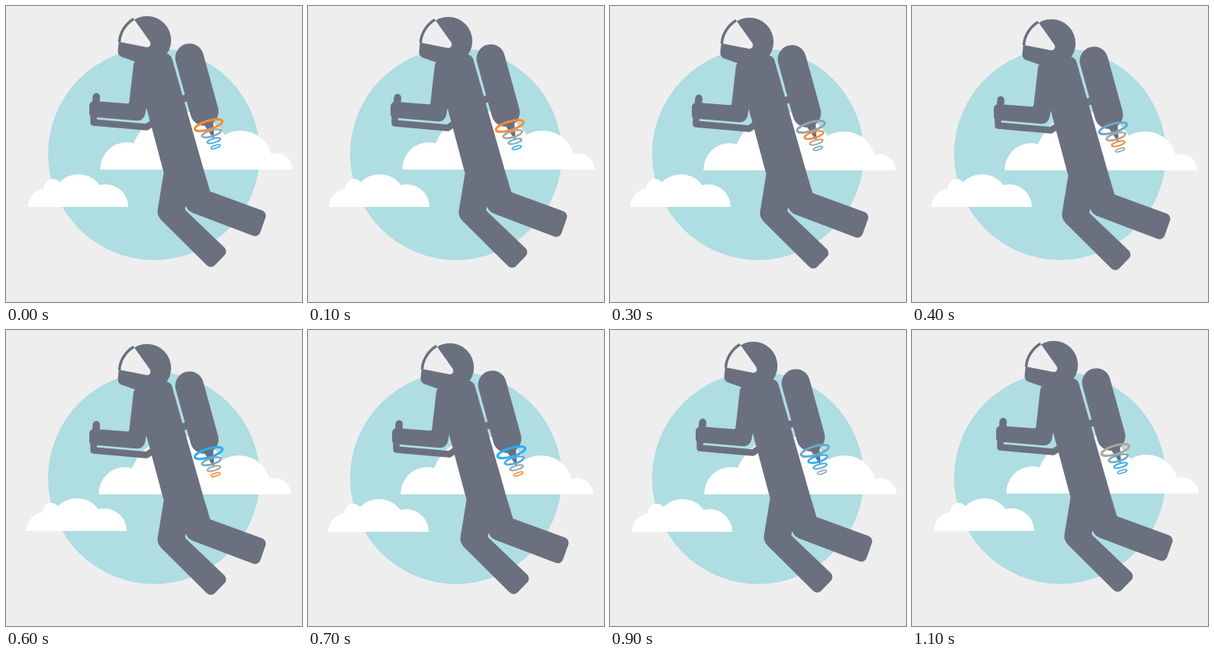
Recreate the animation shown at these times as an HTML page with a canvas. Size 380 by 380 pixels, loop 1.2 s.

```html
<!DOCTYPE html>
<html lang="en">
<head>
<meta charset="utf-8">
<title>Jetpack</title>
<style>
html, body { margin: 0; width: 100%; height: 100%; overflow: hidden; background: #eee; }
canvas { display: block; width: 100vw; height: 100vh; }
</style>
</head>
<body>
<canvas id="stage" width="380" height="380"></canvas>
<script>
const ctx = document.getElementById('stage').getContext('2d');
const LOOP = 1200, STEP = 100;
const SUIT = '#6b707f', SKY = '#aedde2', BACK = '#eeeeee';
const ORANGE = [255, 138, 51], ASH = [176, 164, 154], BLUE = [45, 172, 245];

const clamp = v => Math.min(1, Math.max(0, v));
const mix = (a, b, k) => a.map((v, i) => v + (b[i] - v) * k);

// Cosine drift snapped to whole pixels; peak is the time of the maximum in ms
const drift = (t, mid, amp, peak) =>
  Math.round(mid + amp * Math.cos((t - peak) / LOOP * Math.PI * 2));

function disc(x, y, r, color) {
  ctx.fillStyle = color;
  ctx.beginPath();
  ctx.arc(x, y, r, 0, Math.PI * 2);
  ctx.fill();
}

// Polygon of [x, y, corner radius]
function shape(...points) {
  const last = points[points.length - 1], first = points[0];
  ctx.fillStyle = SUIT;
  ctx.beginPath();
  ctx.moveTo((last[0] + first[0]) / 2, (last[1] + first[1]) / 2);
  points.forEach(([x, y, r = 0], i) => {
    const next = points[(i + 1) % points.length];
    ctx.arcTo(x, y, next[0], next[1], r);
  });
  ctx.closePath();
  ctx.fill();
}

function line(width, ...points) {
  ctx.strokeStyle = SUIT;
  ctx.lineWidth = width;
  ctx.lineCap = ctx.lineJoin = 'round';
  ctx.beginPath();
  points.forEach(([x, y]) => ctx.lineTo(x, y));
  ctx.stroke();
}

function cloud(dx, dy, base, ...puffs) {
  ctx.save();
  ctx.translate(dx, dy);
  ctx.beginPath();
  ctx.rect(0, 0, 400, base);
  ctx.clip();
  puffs.forEach(([x, y, r]) => disc(x, y, r, '#fff'));
  ctx.restore();
}

// Orange fades through ash to blue and back
function glow(t) {
  const phase = ((t - 50) % LOOP + LOOP) % LOOP;
  const d = 1 - Math.abs(phase / 600 - 1);
  const warm = mix(ORANGE, ASH, clamp((d - 0.08) / 0.17));
  return `rgb(${mix(warm, BLUE, clamp((d - 0.25) / 0.67)).map(Math.round)})`;
}

// Each ring is smaller and runs 200 ms behind the one above
function exhaust(t) {
  for (let i = 0; i < 4; i++) {
    const size = 0.69 ** i;
    ctx.strokeStyle = glow(t - i * 200);
    ctx.lineWidth = 0.4 + 2.7 * 0.77 ** i;
    ctx.beginPath();
    ctx.ellipse(260 + 4.2 * i - 0.4 * i * i, 153 + 11.2 * i - 0.65 * i * i,
      18.4 * size, 5.6 * size, -0.29, 0, Math.PI * 2);
    ctx.stroke();
  }
}

function helmet() {
  disc(181, 44, 31, SUIT);
  shape([145, 44, 1], [190, 52], [190, 80], [143, 63.5, 8]);

  // Visor with its rim
  const arc = () => ctx.arc(183.4, 49.1, 38, Math.PI + 0.08, Math.PI + 1.035);
  ctx.fillStyle = BACK;
  ctx.beginPath();
  arc();
  ctx.lineTo(185, 46);
  ctx.quadraticCurveTo(187, 52, 181, 53);
  ctx.closePath();
  ctx.fill();
  ctx.strokeStyle = SUIT;
  ctx.lineWidth = 3.4;
  ctx.lineCap = 'butt';
  ctx.beginPath();
  arc();
  ctx.stroke();
}

function flyer(t) {
  ctx.save();
  ctx.translate(drift(t, 0.1, 2.5, 900), drift(t, 2.495, 2.3, 600));

  // Pack, nozzle and strap
  shape([254, 152], [266, 149], [267.5, 172, 1]);
  line(36.6, [235.6, 66.5], [254.6, 135.5]);
  shape([222, 116], [236, 112], [238, 121], [224, 125]);

  // Torso and legs
  shape([163.5, 68, 10], [211, 60, 9], [262, 239], [232, 256, 4], [202, 212]);
  shape([204, 205], [250, 220], [229, 261, 4], [285.5, 315, 7], [263, 338, 7], [193.5, 269, 15]);
  shape([232, 215], [256, 218], [262, 238], [335.5, 265, 7], [324, 297.5, 7], [230, 262, 14]);

  // Arms
  shape([164.5, 68, 9], [191, 68], [177, 148, 10], [107, 142, 5], [107, 121.5, 6], [158, 125.5, 2]);
  line(9.4, [116, 116.5], [115, 130]);
  line(8.4, [112.5, 138], [112.5, 149.5], [180.5, 155.5], [190, 149]);

  helmet();
  exhaust(t);
  ctx.restore();
}

function draw(now) {
  const t = Math.floor((now % LOOP) / STEP) * STEP;
  ctx.fillStyle = BACK;
  ctx.fillRect(0, 0, 380, 380);
  disc(190, 190, 136, SKY);
  cloud(drift(t, -0.75, 1.15, 1150), drift(t, 0.85, 0.6, 600), 210,
    [155, 209, 34], [225, 201, 66], [301, 201, 41], [347, 210, 21]);
  cloud(drift(t, -1.4, 1.45, 1050), drift(t, 0.1, 0.55, 800), 258,
    [52, 258, 24], [60, 233, 11], [93, 250, 34], [128, 258, 29]);
  flyer(t);
}

const start = performance.now();
function tick() {
  draw(performance.now() - start);
  requestAnimationFrame(tick);
}
tick();
</script>
</body>
</html>
```
